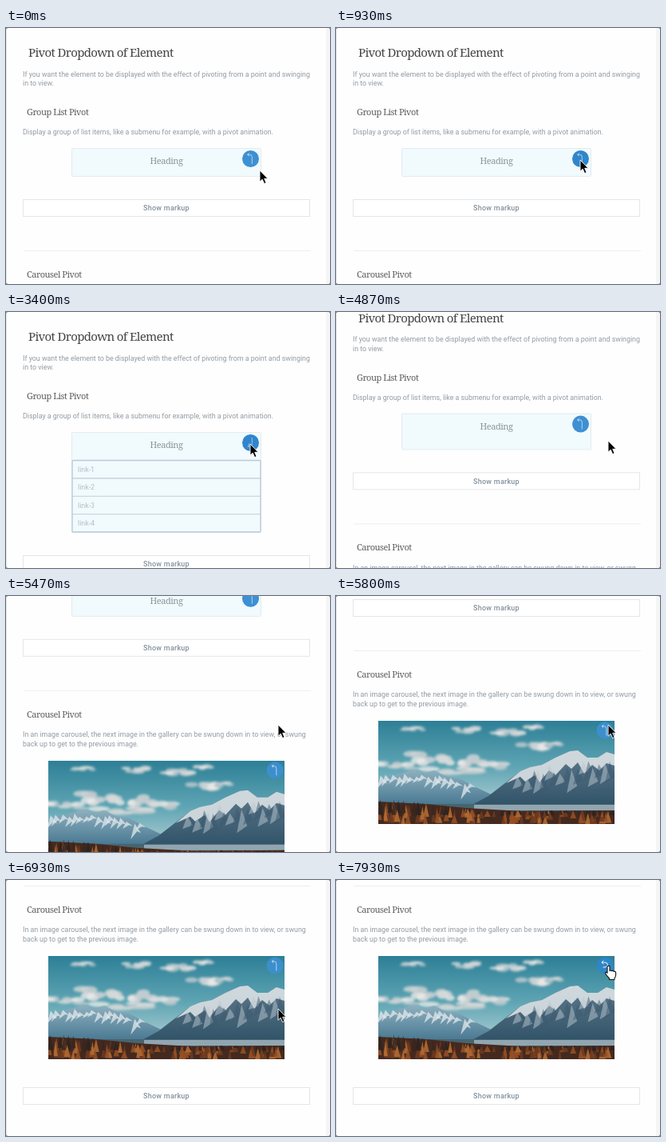
These frames come from a looping animation (406 by 320 pixels, 8 s). An HTML page:

```html
<!DOCTYPE html>
<html lang="en">
<head>
<meta charset="utf-8">
<title>Pivot dropdown</title>
<style>
  html, body { margin: 0; width: 100%; height: 100%; overflow: hidden; background: #6b6b6b; }
  svg { display: block; width: 100vw; height: 100vh; }
  text { font-family: Roboto, "Liberation Sans", sans-serif; font-size: 8.85px; fill: #929ba3; }
  .slab { font-family: "Noto Serif", "Liberation Serif", serif; font-size: 11px; letter-spacing: -.47px; fill: #5c5c5c; }
  .title { font-size: 15px; letter-spacing: -.65px; fill: #444; }
  .head { fill: #8b9499; text-anchor: middle; }
  .btn text { font-size: 9px; font-weight: 500; letter-spacing: .25px; fill: #83909b; text-anchor: middle; }
  .btn rect { fill: #fff; stroke: #e3e6e8; }
  .link { fill: #b4bfc6; }
</style>
</head>
<body>
<svg viewBox="0 0 406 320" preserveAspectRatio="none">
  <defs>
    <clipPath id="window"><rect width="406" height="320" rx="3"/></clipPath>
    <clipPath id="panelClip"><rect id="panelMask" x="82" y="150" width="238" height="36"/></clipPath>
    <clipPath id="photoClip"><rect width="296" height="129"/></clipPath>
    <linearGradient id="sky" x1="0" y1="0" x2="0" y2="1">
      <stop offset="0" stop-color="#2d7f96"/>
      <stop offset=".45" stop-color="#5fa5b4"/>
      <stop offset=".8" stop-color="#a9cbd0"/>
    </linearGradient>
    <linearGradient id="ridge" x1="0" y1="0" x2="0" y2="1">
      <stop offset="0" stop-color="#8fb0bf"/>
      <stop offset="1" stop-color="#44758f"/>
    </linearGradient>
    <linearGradient id="peak" x1="0" y1="0" x2="0" y2="1">
      <stop offset="0" stop-color="#60798c"/>
      <stop offset="1" stop-color="#2f5267"/>
    </linearGradient>
    <filter id="soft" x="-20%" y="-50%" width="140%" height="200%"><feGaussianBlur stdDeviation="1.8"/></filter>
  </defs>
  <g clip-path="url(#window)">
    <rect width="406" height="320" fill="#fefefe"/>
    <g id="page">
      <text class="slab title" x="28" y="36">Pivot Dropdown of Element</text>
      <text x="21" y="60.8">If you want the element to be displayed with the effect of pivoting from a point and swinging</text>
      <text x="21" y="72.3">in to view.</text>
      <text class="slab" x="26" y="109">Group List Pivot</text>
      <text x="21" y="133">Display a group of list items, like a submenu for example, with a pivot animation.</text>

      <rect id="panel" x="82.5" y="150.5" width="237" height="35" rx="1" fill="#f1fafd" stroke="#e2ecf0"/>
      <text class="slab head" x="201" y="170">Heading</text>
      <g clip-path="url(#panelClip)"><g id="list"></g></g>
      <g id="listIcon" transform="translate(306.5 163.5)"></g>

      <g id="rest">
        <g class="btn"><rect x="21.5" y="214.5" width="359" height="21"/><text x="201" y="228.2">Show markup</text></g>
        <path d="M22 278.5H382" stroke="#eeeeee"/>
        <text class="slab" x="26" y="312">Carousel Pivot</text>
        <text x="21" y="336.3">In an image carousel, the next image in the gallery can be swung down in to view, or swung</text>
        <text x="21" y="348.2">back up to get to the previous image.</text>
        <g transform="translate(53 366)"><g id="photo" clip-path="url(#photoClip)"></g></g>
        <g id="photoIcon" transform="translate(337 378)"></g>
        <g class="btn"><rect x="21.5" y="530.5" width="359" height="21"/><text x="201" y="544.2">Show markup</text></g>
      </g>
    </g>
    <rect x="401" width="5" height="320" fill="#f5f5f5"/>
    <path d="M.5 0V320" stroke="#e4e4e4"/>
    <g id="cursor">
      <path id="arrow" d="M0 0V14.2L3.2 11.2L5.6 16.6L8 15.6L5.7 10.3H10Z" fill="#000" stroke="#fff" stroke-width=".9"/>
      <path id="hand" transform="translate(-4.5 0)" fill="#fff" stroke="#111" stroke-width="1.1" stroke-linejoin="round"
        d="M3 1.5Q4.5 0 6 1.5V7Q7.5 5.8 8.6 7.2Q10 6.4 11 7.8Q13 7.2 13.6 9V12Q13.5 15 12 16.2V18H5.5V16.5Q3 14 1 11Q0 9.5 1.2 8.8Q2.2 8.6 3 9.8Z"/>
    </g>
  </g>
</svg>
<script>
const LOOP = 8000;
const $ = id => document.getElementById(id);
const clamp = v => Math.min(1, Math.max(0, v));
const span = (t, from, to) => clamp((t - from) / (to - from));
const smooth = u => u * u * (3 - 2 * u);

// CSS "ease": cubic-bezier(.25, .1, .25, 1)
function ease(x) {
  const bez = (a, b, s) => 3 * a * s * (1 - s) ** 2 + 3 * b * s * s * (1 - s) + s ** 3;
  let lo = 0, hi = 1;
  for (let i = 0; i < 24; i++) {
    const mid = (lo + hi) / 2;
    if (bez(.25, .25, mid) < x) lo = mid; else hi = mid;
  }
  return bez(.1, 1, lo);
}

function seeded(seed) {
  return () => (seed = (seed * 16807) % 2147483647) / 2147483647;
}

function buildList() {
  let out = '<rect x="83" y="185.5" width="236" height="89.5" rx="1" fill="#f1fafd" stroke="#b9cad8" stroke-width="1.3"/>';
  for (let i = 0; i < 4; i++) {
    const y = 185.5 + i * 22.4;
    if (i) out += `<path d="M83 ${y}H319" stroke="#bccdd9" stroke-width="1.1"/>`;
    out += `<text class="link" x="90" y="${y + 14.5}">link-${i + 1}</text>`;
  }
  $('list').innerHTML = out;
}

function buildIcon(id, alpha) {
  $(id).innerHTML = `<circle r="10.5" fill="#3d90d3" opacity="${alpha}"/>
    <path fill="none" stroke="#fff" stroke-width="1" stroke-linecap="round"/>`;
}

function buildPhoto() {
  const rnd = seeded(71);
  const shape = (pts, fill, alpha = 1) => `<polygon points="${pts}" fill="${fill}" opacity="${alpha}"/>`;
  let out = '<rect width="296" height="129" fill="url(#sky)"/><g filter="url(#soft)">';
  // each cloud: centre, half width, half height
  const clouds = [[18, 55, 24, 7], [62, 46, 28, 9], [100, 50, 26, 8], [135, 55, 28, 8], [82, 63, 50, 6],
    [42, 10, 20, 3], [108, 12, 20, 5], [162, 14, 24, 6], [197, 8, 16, 4], [192, 33, 24, 6], [215, 30, 16, 4]];
  for (const [cx, cy, w, h] of clouds) {
    for (let i = 0; i < 9; i++) {
      const x = cx + (rnd() * 2 - 1) * w * .8, y = cy + (rnd() * 2 - 1) * h * .6;
      const tone = ['#eceae7', '#d6d8d8', '#c2cccf'][i % 3];
      out += `<ellipse cx="${x}" cy="${y}" rx="${w * (.2 + rnd() * .2)}" ry="${h * (.3 + rnd() * .3)}" fill="${tone}" opacity=".8"/>`;
    }
  }
  out += '</g>';
  out += shape('0,74 20,68 45,61 56,66 70,62 86,70 102,72 118,81 150,96 150,108 0,108', 'url(#ridge)');
  for (let i = 0; i < 16; i++) {
    const x = i * 7.5 + rnd() * 4, y = 66 + Math.max(0, x - 70) * .25 + rnd() * 4, h = 8 + rnd() * 13;
    out += shape(`${x},${y} ${x + 8},${y + h * .6} ${x + 3},${y + h * .5} ${x - 5},${y + h}`, '#e1e9ec', .75);
  }
  out += shape('112,108 138,94 160,77 178,63 190,58 205,55 222,46 240,38 250,37 262,46 275,46 286,39 296,42 296,108', 'url(#peak)');
  out += shape('160,78 178,63 190,58 205,55 222,46 240,38 250,37 262,46 275,46 286,39 296,42 296,56 286,53 277,62 268,55 258,66 250,52 242,60 235,54 222,68 214,62 202,77 196,68 184,76 178,70', '#dfe5e8', .88);
  for (let i = 0; i < 18; i++) {
    const x = 172 + i * 6.8 + rnd() * 4, y = 60 - (x - 172) * .12 + rnd() * 14, h = 14 + rnd() * 18;
    out += shape(`${x},${y} ${x + 7},${y + h * .7} ${x - 6},${y + h}`, i % 2 ? '#3d5a70' : '#b9c7d0', .5);
  }
  out += '<rect y="104" width="296" height="25" fill="#47646f"/><rect x="120" y="105" width="176" height="7" fill="#91a6b1"/>';
  out += shape('0,101 60,104 110,109 180,113 296,112 296,129 0,129', '#44291f');
  const leaf = ['#2c2420', '#3b271e', '#6d3a20', '#934f25', '#b16a32'];
  for (let i = 0; i < 150; i++) {
    const x = rnd() * 296, depth = rnd(), base = 113 + depth * 18;
    const h = 9 + rnd() * 9 + (x < 90 ? 4 * (1 - depth) : 0), w = 2 + rnd() * 2.5;
    const dark = depth < .35 ? 0 : 2;
    const top = Math.max(base - h, 96 + Math.min(16, x * .12));
    out += shape(`${x},${top} ${x + w},${base} ${x - w},${base}`, leaf[dark + Math.floor(rnd() * (dark ? 3 : 2))], .9);
  }
  $('photo').innerHTML = out;
}

const CURL = 'M1.8 6V-2.2Q1.8 -5.2 -.8 -5.2H-3.6M-2 -6.8L-3.8 -5.2L-2 -3.6';
const CURL_DOWN = 'M1.8 -6V2.2Q1.8 4.6 -.6 4.6H-3M-1.6 1L-3 4.6';
const CURL_HOT = 'M-3.8 -4H0Q3.4 -4 3.4 -1Q3.4 2 0 2H-2M-2 -6L-4 -4L-2 -2';

function drawIcon(id, hot, path, glyphAlpha) {
  const [disc, glyph] = $(id).children;
  disc.setAttribute('fill', hot ? '#2f86cb' : '#3d90d3');
  glyph.setAttribute('d', path);
  glyph.setAttribute('opacity', glyphAlpha);
}

// time, scroll offset, speed per ms
const scrollKeys = [[4700, 0, .08], [5470, 160, .17], [6130, 249, .105], [6400, 271, 0]];

function scrollAt(t) {
  if (t <= scrollKeys[0][0]) return 0;
  for (let i = 1; i < scrollKeys.length; i++) {
    const [t0, a, va] = scrollKeys[i - 1], [t1, b, vb] = scrollKeys[i];
    if (t > t1) continue;
    const d = t1 - t0, u = (t - t0) / d, w = 1 - u;
    return a * (1 + 2 * u) * w * w + va * d * u * w * w + b * u * u * (3 - 2 * u) - vb * d * u * u * w;
  }
  return 271;
}

const cursorKeys = [[70, 318, 178], [730, 306, 165], [4050, 306, 165], [4670, 341, 161],
  [7000, 341, 161], [7330, 372, 140], [7860, 341.5, 106.5]];

function cursorAt(t) {
  let prev = cursorKeys[0];
  for (const key of cursorKeys) {
    if (t <= key[0]) {
      const u = key === prev ? 0 : smooth(span(t, prev[0], key[0]));
      return [prev[1] + (key[1] - prev[1]) * u, prev[2] + (key[2] - prev[2]) * u];
    }
    prev = key;
  }
  return prev.slice(1);
}

function draw(t) {
  const grow = 90 * (ease(span(t, 1400, 1800)) - ease(span(t, 4670, 5000)));
  $('panel').setAttribute('height', 35 + grow);
  $('panelMask').setAttribute('height', 36 + grow);
  $('rest').setAttribute('transform', `translate(0 ${grow})`);

  const swingIn = span(t, 1850, 2670), swingOut = span(t, 3870, 4670);
  const angle = 90 * (1 - ease(swingIn) + ease(swingOut));
  $('list').setAttribute('transform', `rotate(${angle} 319 185)`);
  $('list').setAttribute('opacity', Math.min(clamp(swingIn * 7), clamp((1 - swingOut) * 6)));

  $('page').setAttribute('transform', `translate(0 ${-scrollAt(t)})`);

  const open = t >= 1400 && t < 3900;
  drawIcon('listIcon', t > 500 && t < 4250, open ? CURL_DOWN : CURL, open ? .5 : .6);
  const onPhoto = t > 7730;
  drawIcon('photoIcon', onPhoto, onPhoto ? CURL_HOT : CURL, onPhoto ? .9 : .6);

  $('cursor').setAttribute('transform', `translate(${cursorAt(t)})`);
  $('arrow').style.display = onPhoto ? 'none' : '';
  $('hand').style.display = onPhoto ? '' : 'none';
}

buildList();
buildIcon('listIcon', 1);
buildIcon('photoIcon', .88);
buildPhoto();

const start = performance.now();
function tick() {
  draw((performance.now() - start) % LOOP);
  requestAnimationFrame(tick);
}
tick();
</script>
</body>
</html>
```
